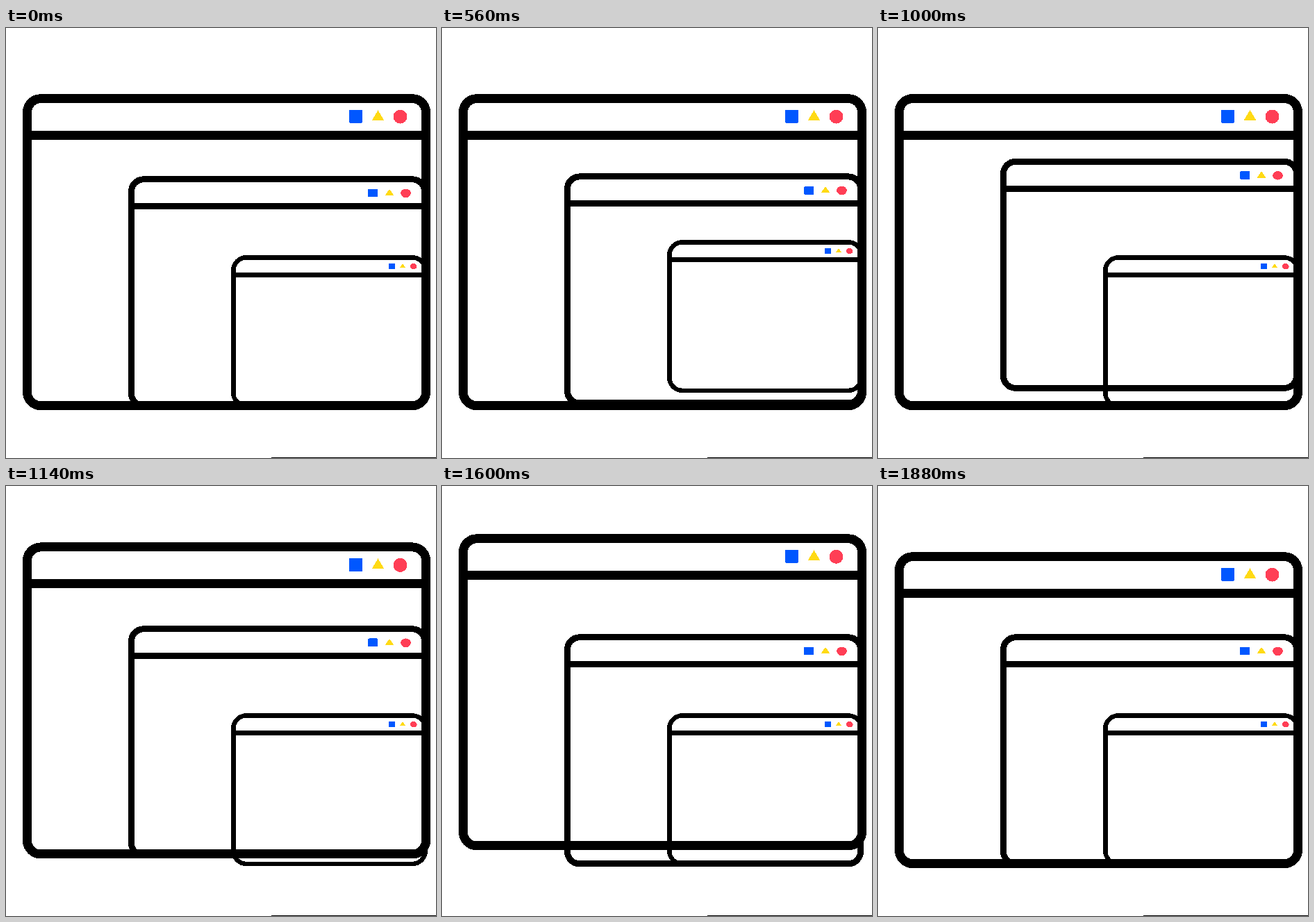
Animation, 619 px wide and 619 px high, one loop 2580 ms. Source, as an HTML page:

```html
<!DOCTYPE html>
<html lang="en">
<head>
<meta charset="utf-8">
<title>Stacked windows</title>
<style>
  html, body { margin: 0; width: 100%; height: 100%; overflow: hidden; background: #fff; }
  svg { display: block; width: 100vw; height: 100vh; }
</style>
</head>
<body>
<svg viewBox="0 0 619 619" shape-rendering="crispEdges">
  <defs>
    <g id="icons">
      <rect x="-41.5" y="-10" width="19" height="19" rx="1.5" fill="#0057ff"/>
      <path d="M0-9.5 8.8 5.2H-8.8Z" fill="#ffda14"/>
      <circle cx="32" r="10" fill="#ff3e55"/>
    </g>
  </defs>
  <g id="stage" fill="none" stroke="#000"></g>
  <path d="M382 618H619V619H382Z"/>
</svg>
<script>
const LOOP = 2580, MOVE = 290;

// Outer box, line width, corner radius, title line offset, icon centre and scale,
// lift height, and the times at which the window starts to rise and to sink.
const windows = [
  { x: 24, y: 95.2, w: 587, h: 455, line: 13, r: 26, bar: 53,
    icons: [535.5, 32.5, 1, 1], lift: 26, rise: 990, sink: 1590 },
  { x: 176, y: 213.3, w: 431, h: 335, line: 9, r: 22, bar: 39,
    icons: [552, 24.5, 0.735, 0.63], lift: 25.6, rise: 490, sink: 990 },
  { x: 324, y: 327.2, w: 283, h: 220, line: 6.5, r: 22, bar: 25,
    icons: [571, 16, 0.49, 0.42], lift: 26, rise: -10, sink: 490 }
];

const stage = document.getElementById("stage");

function build({ x, w, h, line, r, bar, icons: [cx, cy, sx, sy] }) {
  const half = line / 2;
  stage.insertAdjacentHTML("beforeend", `<g stroke-width="${line}">
    <rect x="${x + half}" y="${half}" width="${w - line}" height="${h - line}" rx="${r - half}"/>
    <path d="M${x + half} ${bar + half}H${x + w - half}"/>
    <use href="#icons" stroke="none" transform="translate(${cx} ${cy}) scale(${sx} ${sy})"/>
  </g>`);
  return stage.lastElementChild;
}

function ease(ms) {
  const p = Math.min(1, Math.max(0, ms / MOVE));
  return p * p * (3 - 2 * p);
}

for (const win of windows) win.el = build(win);

const start = performance.now();
function draw(now) {
  const t = Math.max(0, now - start) % LOOP;
  for (const { el, y, lift, rise, sink } of windows) {
    const up = lift * (ease(t - rise) - ease(t - sink));
    el.setAttribute("transform", `translate(0 ${y - up})`);
  }
  requestAnimationFrame(draw);
}
draw(start);
</script>
</body>
</html>
```
